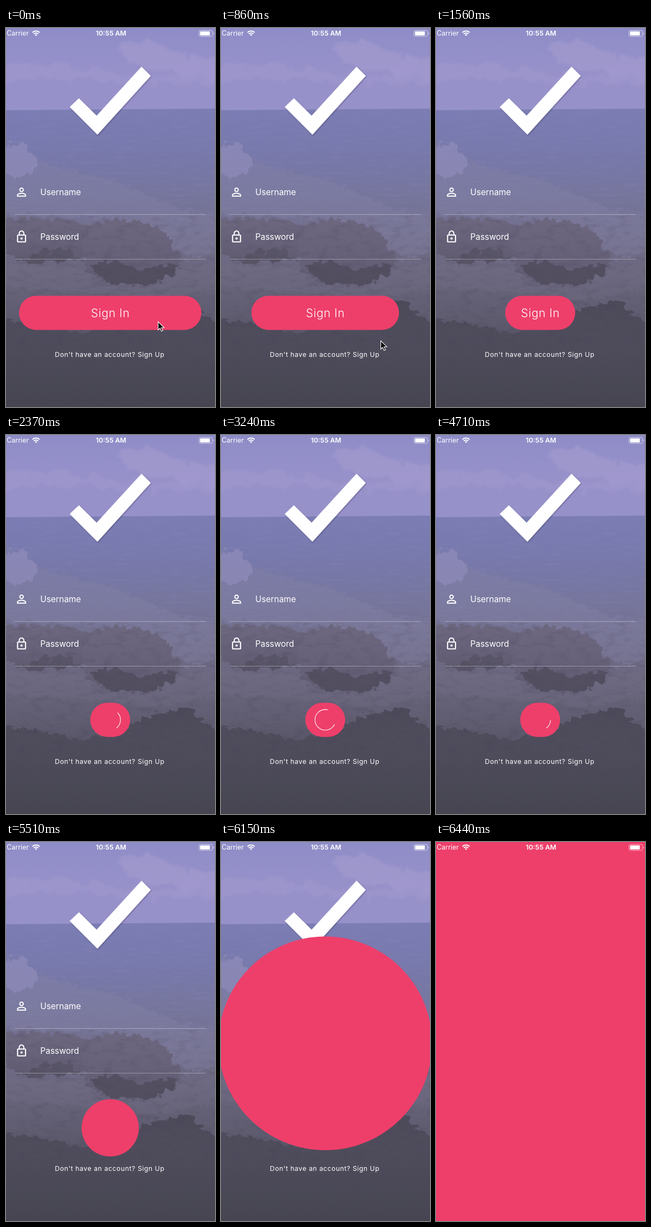
Animation, 384 px wide and 696 px high, one loop 6.8 s. Source, as an HTML page:

```html
<!DOCTYPE html>
<html lang="en">
<head>
<meta charset="utf-8">
<title>Sign in</title>
<style>
  html, body { margin: 0; width: 100%; height: 100%; overflow: hidden; background: #454450; }
  svg { position: absolute; left: 0; top: 0; width: 100%; height: 100%; }
  #scene { will-change: transform; }
  text { font-family: Inter, Roboto, sans-serif; fill: #fff; white-space: pre; }
  .field { font-size: 15.4px; }
  .status { font-size: 12.4px; }
  .rule { stroke: #fff; stroke-opacity: .34; }
</style>
</head>
<body>
<svg id="scene" viewBox="0 0 384 696">
  <defs>
    <linearGradient id="sky" x2="0" y2="1">
      <stop offset="0" stop-color="#8e8cc7"/><stop offset=".5" stop-color="#9791ca"/><stop offset="1" stop-color="#9791c9"/>
    </linearGradient>
    <linearGradient id="sea" gradientUnits="userSpaceOnUse" x1="0" y1="148" x2="0" y2="696">
      <stop offset="0" stop-color="#7b7db4"/><stop offset=".13" stop-color="#7879ad"/>
      <stop offset=".27" stop-color="#76769f"/><stop offset=".4" stop-color="#73708e"/>
      <stop offset=".55" stop-color="#6a667e"/><stop offset=".7" stop-color="#5f5c70"/>
      <stop offset=".85" stop-color="#4e4c5b"/><stop offset="1" stop-color="#464551"/>
    </linearGradient>
    <linearGradient id="rock" x2="0" y2="1">
      <stop offset="0" stop-color="#6d6880"/><stop offset=".5" stop-color="#67627a"/><stop offset="1" stop-color="#5f5a6e"/>
    </linearGradient>
    <linearGradient id="shore" x2="0" y2="1">
      <stop offset="0" stop-color="#4c4a59"/><stop offset="1" stop-color="#464551" stop-opacity="0"/>
    </linearGradient>
    <filter id="rough" x="-20%" y="-20%" width="140%" height="140%" color-interpolation-filters="sRGB">
      <feTurbulence type="fractalNoise" baseFrequency=".08" numOctaves="5" seed="4"/>
      <feDisplacementMap in="SourceGraphic" scale="22" xChannelSelector="R" yChannelSelector="G"/>
      <feGaussianBlur stdDeviation=".7"/>
    </filter>
    <filter id="puff" x="-20%" y="-30%" width="140%" height="160%" color-interpolation-filters="sRGB">
      <feTurbulence type="fractalNoise" baseFrequency=".035" numOctaves="4" seed="9"/>
      <feDisplacementMap in="SourceGraphic" scale="40" xChannelSelector="R" yChannelSelector="G"/>
      <feGaussianBlur stdDeviation="2"/>
    </filter>
    <filter id="ripple" x="0" y="0" width="100%" height="100%" color-interpolation-filters="sRGB">
      <feTurbulence type="fractalNoise" baseFrequency=".03 .2" numOctaves="4" seed="2"/>
      <feColorMatrix values="0 0 0 0 .56 0 0 0 0 .55 0 0 0 0 .74 2.2 0 0 0 -1.08"/>
    </filter>
    <filter id="grain" x="0" y="0" width="100%" height="100%" color-interpolation-filters="sRGB">
      <feTurbulence type="fractalNoise" baseFrequency=".045 .1" numOctaves="5" seed="7"/>
      <feColorMatrix values="0 0 0 0 .26 0 0 0 0 .24 0 0 0 0 .32 2.4 0 0 0 -1.2"/>
    </filter>
  </defs>
  <rect width="384" height="152" fill="url(#sky)"/>
  <g fill="#a39bce" filter="url(#puff)">
    <path d="M204 24 250 18 300 42 400 62V94L330 90 280 72 225 60Z" opacity=".65"/>
    <path d="M-10 74 60 66 130 72 200 84 390 92V106L200 100 60 94-10 98Z" opacity=".45"/>
  </g>
  <path d="M0 151 384 148V696H0Z" fill="url(#sea)"/>
  <rect y="153" width="384" height="200" filter="url(#ripple)" opacity=".25"/>
  <g filter="url(#rough)">
    <path d="M-12 216 30 212 62 244 110 258 160 270 215 286 265 308 325 334 400 345V410L330 424 290 372 210 350 100 345-12 340Z" fill="#8480a5" opacity=".42"/>
    <path d="M-12 222 32 210 58 244 50 264 20 276-12 264Z" fill="#9490bf" opacity=".55"/>
    <path d="M-12 430 60 438 145 440 165 470 260 478 330 440 400 430V476L270 500 130 484-12 476Z" fill="#757189" opacity=".3"/>
    <path d="M-12 348 90 350 158 362 152 420 130 426 30 432-12 400Z" fill="url(#rock)"/>
    <path d="M142 392 160 358 200 350 262 358 300 382 320 428 308 456 245 474 190 468 150 452Z" fill="url(#rock)"/>
    <path d="M150 436 200 428 250 446 300 432 316 436 305 458 245 473 190 468Z" fill="#4a4756" opacity=".6"/>
    <path d="M30 430 60 410 110 406 140 426Z" fill="#504c5c" opacity=".5"/>
    <path d="M-12 534 90 548 140 560 225 538 255 516 335 502 352 520 400 545V696H-12Z" fill="url(#shore)"/>
  </g>
  <rect y="345" width="384" height="240" filter="url(#grain)" opacity=".22"/>
</svg>

<svg viewBox="0 0 384 696">
  <defs>
    <filter id="shade" x="-10%" y="-10%" width="120%" height="120%">
      <feDropShadow dx="1" dy="1.5" stdDeviation="1.2" flood-color="#302c50" flood-opacity=".4"/>
    </filter>
  </defs>
  <g id="page">
    <path d="M117 145 134 129 166.500 161 249 71 266 88 168 196Z" fill="#fff" filter="url(#shade)"/>
    <g fill="#fff">
      <path transform="translate(16 288.800) scale(1.047)" d="M12 5.900a2.100 2.100 0 1 1 0 4.200 2.100 2.100 0 0 1 0-4.200m0 9c2.970 0 6.100 1.460 6.100 2.100v1.100H5.900V17c0-.64 3.130-2.100 6.100-2.100M12 4C9.790 4 8 5.790 8 8s1.790 4 4 4 4-1.790 4-4-1.790-4-4-4zm0 9c-2.670 0-8 1.340-8 4v3h16v-3c0-2.660-5.330-4-8-4z"/>
      <path transform="translate(16 370.800) scale(1.047)" d="M12 17c1.100 0 2-.9 2-2s-.9-2-2-2-2 .9-2 2 .9 2 2 2zm6-9h-1V6c0-2.760-2.240-5-5-5S7 3.240 7 6v2H6c-1.100 0-2 .9-2 2v10c0 1.100.9 2 2 2h12c1.100 0 2-.9 2-2V10c0-1.100-.9-2-2-2zM8.900 6c0-1.710 1.390-3.100 3.100-3.100s3.100 1.390 3.100 3.100v2H8.900V6zM18 20H6V10h12v10z"/>
    </g>
    <text class="field" x="63" y="307">Username</text>
    <text class="field" x="63" y="389">Password</text>
    <path class="rule" d="M16 342.500H367M16 424.500H367"/>
    <text x="89.800" y="604" font-size="12.200" letter-spacing=".57">Don't have an account? Sign Up</text>
    <rect id="button" fill="#ee3f6a"/>
    <text id="label" x="156" y="531" font-size="21" font-weight="300" letter-spacing=".65">Sign In</text>
    <path id="spinner" fill="none" stroke="#fff" stroke-width="1.100"/>
  </g>
  <text class="status" x="1.300" y="14">Carrier</text>
  <g fill="none" stroke="#fff" stroke-width="2">
    <path d="M48.600 8.300a9.300 9.300 0 0 1 13.200 0M51 10.900a5.900 5.900 0 0 1 8.400 0"/>
    <path d="M55.200 14.800 53 12.600a3.200 3.200 0 0 1 4.400 0Z" fill="#fff" stroke="none"/>
  </g>
  <text class="status" x="193" y="14" text-anchor="middle" font-weight="600">10:55 AM</text>
  <rect x="354.500" y="4.500" width="25" height="11" rx="2.800" fill="none" stroke="#fff" stroke-opacity=".55"/>
  <rect x="356.500" y="6.300" width="18" height="7.400" rx="1.200" fill="#fff"/>
  <path d="M381 8v4a2.200 2.200 0 0 0 0-4Z" fill="#fff" opacity=".55"/>
  <path id="cursor" d="M0 0v15l3.500-3.300 2.500 5.600 2.600-1.100-2.500-5.400h5Z" stroke="#fff" stroke-width="1.100"/>
</svg>

<script>
const LOOP = 6800, START = 548, SCALE = 1.047;
const MID = 191.5, SCREEN = 375 * SCALE, BASE = 606.8;
const [page, button, label, spinner, cursor] =
  ['page', 'button', 'label', 'spinner', 'cursor'].map(id => document.getElementById(id));

const clamp = x => Math.min(1, Math.max(0, x));
const span = (x, a, b) => clamp((x - a) / (b - a));
const set = (el, attrs) => { for (const k in attrs) el.setAttribute(k, attrs[k]); };
const show = (el, on) => { el.style.display = on ? '' : 'none'; };

function bezier(x1, y1, x2, y2) {
  const at = (a, b, s) => 3 * a * s * (1 - s) ** 2 + 3 * b * s * s * (1 - s) + s ** 3;
  return x => {
    let lo = 0, hi = 1;
    for (let i = 0; i < 24; i++) {
      const s = (lo + hi) / 2;
      if (at(x1, x2, s) < x) lo = s; else hi = s;
    }
    return at(y1, y2, lo);
  };
}
const ease = bezier(.25, .1, .25, 1);
const fastOutSlowIn = bezier(.4, 0, .2, 1);

const progress = t => t < 5510 ? clamp((t - START) / 8563) : .5795 + (t - 5510) / 8828;

function arc(ms) {
  const u = ms / 3805, r = 18.9, cy = 523.1;
  const head = fastOutSlowIn(span(u, 0, .5)), tail = fastOutSlowIn(span(u, .5, 1));
  const from = Math.PI * (-.5 + 1.5 * tail + 1.7 * u);
  const sweep = Math.max(1.5 * Math.PI * (head - tail), .001);
  const point = a => `${MID + r * Math.cos(a)} ${cy + r * Math.sin(a)}`;
  return `M${point(from)}A${r} ${r} 0 ${sweep > Math.PI ? 1 : 0} 1 ${point(from + sweep)}`;
}

function placeButton(w, h, bottom, rx) {
  set(button, { x: MID - w / 2, y: bottom - h, width: w, height: h, rx });
}

function draw(t) {
  const p = progress(t);
  const width = 320 - 250 * span(p, 0, .15);
  const zooming = p > .55;
  let shift = 0;

  if (zooming) {
    // the opening fall of a bounce-out curve
    const size = 70 + 930 * clamp(7.5625 * span(p, .55, .999) ** 2);
    const h = size * SCALE, w = Math.min(h, SCREEN);
    const pad = 50 * SCALE * (1 - ease(span(p, .5, .8)));
    shift = Math.max(0, h + pad - BASE);
    if (size < 500) placeButton(w, w, BASE - pad - (h - w) / 2, w / 2);
    else placeButton(w, h, BASE - pad, 0);
  } else {
    placeButton(width * SCALE, 60 * SCALE, BASE - 50 * SCALE, 30 * SCALE);
  }

  const loading = !zooming && width <= 75;
  show(label, !zooming && !loading);
  show(spinner, loading);
  if (loading) set(spinner, { d: arc(t - 1807) });
  set(page, { transform: `translate(0 ${shift})` });

  const leave = span(t, 650, 1100);
  show(cursor, leave < 1);
  set(cursor, { transform: `translate(${279.5 + 30 * leave} ${539.5 + 160 * leave * leave})` });
}

const origin = performance.now();
function tick() {
  draw((performance.now() - origin) % LOOP);
  requestAnimationFrame(tick);
}
tick();
</script>
</body>
</html>
```
